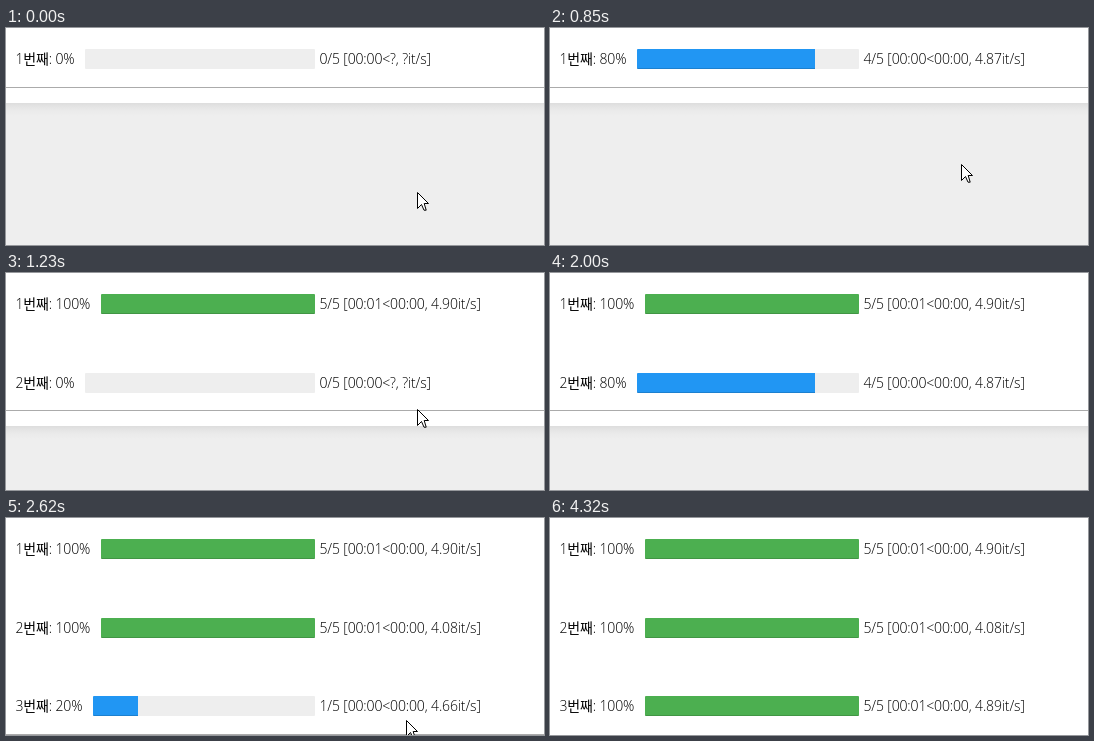
Write an HTML page that moves like this. It is 538 px wide and 217 px high and loops after 4.85 s.

```html
<!DOCTYPE html>
<html lang="ko">
<head>
<meta charset="utf-8">
<title>Progress bars</title>
<style>
html, body { margin: 0; width: 100%; height: 100%; overflow: hidden; background: #eee; }
svg { display: block; overflow: hidden; }
text {
  font: 300 14px "Open Sans", "Noto Sans", "Noto Sans CJK KR", "Noto Sans CJK", sans-serif;
  letter-spacing: -.14px; white-space: pre; fill: #000;
}
</style>
</head>
<body>
<svg id="stage" width="538" height="217" viewBox="0 0 538 217">
  <linearGradient id="shade" x2="0" y2="1">
    <stop stop-color="#575757" stop-opacity=".113"/>
    <stop offset=".3" stop-color="#575757" stop-opacity=".062"/>
    <stop offset=".6" stop-color="#575757" stop-opacity=".024"/>
    <stop offset="1" stop-color="#575757" stop-opacity="0"/>
  </linearGradient>
  <g id="sheet">
    <rect y="-300" width="538" height="316" fill="#fff"/>
    <rect width="538" height="1" fill="#ababab"/>
    <rect y="16" width="538" height="13" fill="url(#shade)"/>
  </g>
</svg>
<script>
const LOOP = 4850, TICK = 77;   // the screen refreshes once per tick
const TOTAL = 5, PACE = 2.65;   // items per bar, ticks per item
const PITCH = 78.5, BAR_END = 309;
const stage = document.getElementById('stage');
const sheet = document.getElementById('sheet');

// first: tick of the first finished item; rate: final speed
const rows = [
  { first: 2.1, rate: 4.90 },
  { first: 17.88, rate: 4.08 },
  { first: 33.1, rate: 4.89 }
];

// pointer key points: [tick, x, y]
const path = [
  [0, 411, 164], [9, 411, 164], [11, 411, 136], [16, 411, 136], [21, 404, 230],
  [31, 403, 230], [34, 400, 202], [38, 400, 200], [53, 400, 200], [56, 400, 220]
];

function set(el, attrs) {
  for (const key in attrs) el.setAttribute(key, attrs[key]);
}

function add(parent, tag, attrs) {
  const el = document.createElementNS('http://www.w3.org/2000/svg', tag);
  set(el, attrs);
  parent.appendChild(el);
  return el;
}

rows.forEach((row, i) => {
  const g = row.g = add(stage, 'g', { transform: `translate(0 ${Math.round(21 + PITCH * i)})` });
  const clip = add(g, 'clipPath', { id: 'clip' + i });
  const track = add(g, 'g', { 'clip-path': `url(#clip${i})` });
  row.clip = add(clip, 'rect', { height: 20, rx: 1 });
  row.back = add(track, 'rect', { height: 20, fill: '#eee' });
  row.fill = add(track, 'rect', { height: 20 });
  row.edge = add(track, 'rect', { y: 19, height: 1, 'fill-opacity': .15 });
  row.left = add(g, 'text', { x: 9.5, y: 15 });
  row.right = add(g, 'text', { x: 313.5, y: 15 });
});

const cursor = add(stage, 'path', {
  d: 'M.5.5V16.5L4.5 12.5L7 18.2H9.2L7.2 11.5H11.5Z', fill: '#fff', stroke: '#000'
});

function itemsDone(row, tick) {
  let n = 0;
  while (n < TOTAL && Math.round(row.first + PACE * n) <= tick) n++;
  return n;
}

const isShown = (row, tick) => tick >= Math.round(row.first) - 2;

function drawRow(row, i, tick) {
  row.g.style.display = isShown(row, tick) ? '' : 'none';
  const n = itemsDone(row, tick), full = n === TOTAL;
  const percent = String(n * 100 / TOTAL);
  const x = 71 + 8 * percent.length, width = BAR_END - x;
  const filled = { x, width: Math.ceil(width * n / TOTAL) };
  set(row.clip, { x, width });
  set(row.back, { x, width });
  set(row.fill, filled);
  set(row.fill, { fill: full ? '#4caf50' : '#2196f3' });
  set(row.edge, filled);
  const rate = full ? row.rate : 4.94 - .28 / n;
  const rest = n ? `00:00, ${rate.toFixed(2)}` : '?, ?';
  row.left.textContent = `${i + 1}번째: ${percent}%`;
  row.right.textContent = `${n}/${TOTAL} [00:0${full ? 1 : 0}<${rest}it/s]`;
}

function pointerAt(tick) {
  const next = path.findIndex(point => point[0] > tick);
  if (next < 0) return path[path.length - 1].slice(1);
  const [t0, ...from] = path[next - 1], [t1, ...to] = path[next];
  const k = (tick - t0) / (t1 - t0);
  return from.map((v, j) => Math.round(v + (to[j] - v) * k));
}

function draw(t) {
  const tick = Math.floor(t / TICK + .15);
  const last = rows.filter(row => isShown(row, tick)).length - 1;
  // a finished bar adds blank lines below it
  const gap = itemsDone(rows[last], tick) === TOTAL ? 34 : 0;
  set(sheet, { transform: `translate(0 ${Math.round(58.9 + PITCH * last + gap)})` });
  rows.forEach((row, i) => drawRow(row, i, tick));
  set(cursor, { transform: `translate(${pointerAt(tick)})` });
}

const start = performance.now();
function play() {
  draw((performance.now() - start) % LOOP);
  requestAnimationFrame(play);
}
play();
</script>
</body>
</html>
```
